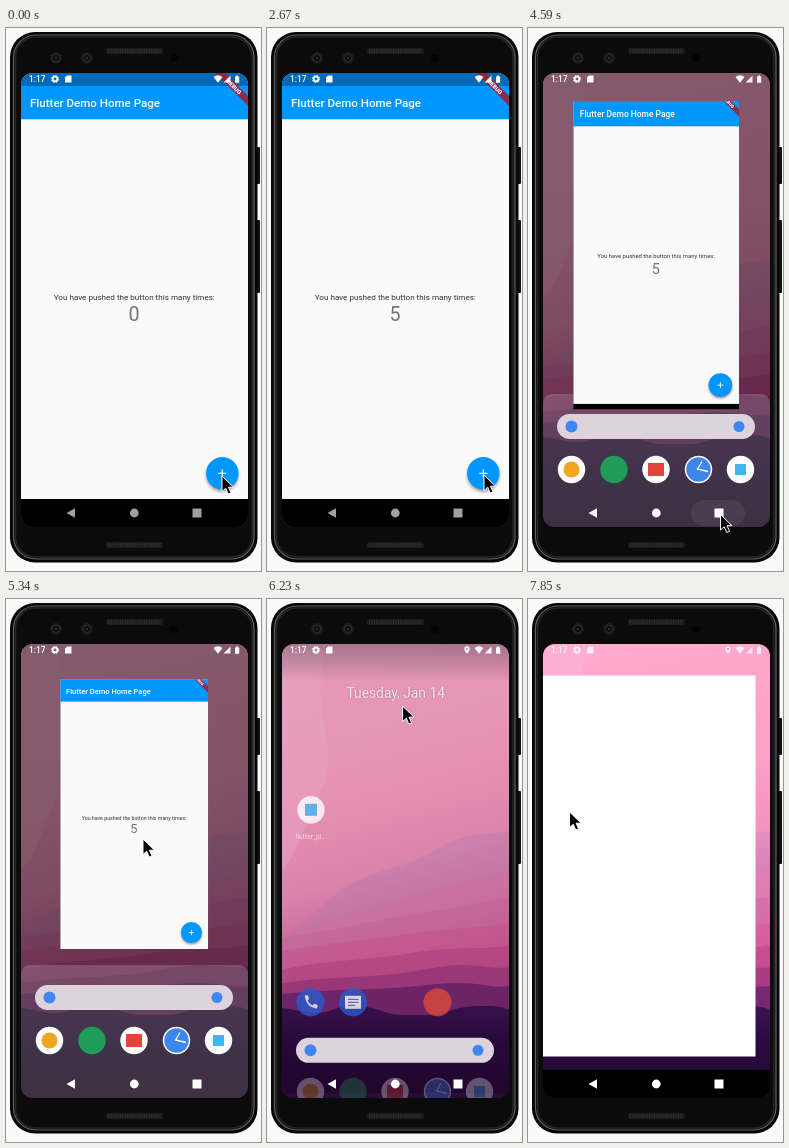
Recreate the animation shown at these times as an HTML page. Size 255x543 px, loop 8 s.

```html
<!DOCTYPE html>
<html lang="en">
<head>
<meta charset="utf-8">
<title>Counter demo</title>
<style>
html, body { margin: 0; width: 100%; height: 100%; overflow: hidden; background: #fafafa; }
svg { display: block; width: 100vw; height: 100vh; font-family: Roboto, "Noto Sans", sans-serif; }
</style>
</head>
<body>
<svg id="stage" viewBox="0 0 255 543"></svg>
<script>
const LOOP = 8000;

const disc = (x, y, r, fill, extra = '') => `<circle cx="${x}" cy="${y}" r="${r}" fill="${fill}" ${extra}/>`;
const box = (x, y, w, h, fill, extra = '') => `<rect x="${x}" y="${y}" width="${w}" height="${h}" fill="${fill}" ${extra}/>`;
const path = (d, fill, extra = '') => `<path d="${d}" fill="${fill}" ${extra}/>`;
const text = (x, y, size, fill, str, extra = '') =>
  `<text x="${x}" y="${y}" font-size="${size}" fill="${fill}" ${extra}>${str}</text>`;
const group = (id, body, extra = '') => `<g id="${id}" ${extra}>${body}</g>`;
const gradient = (id, stops, axis = 'x1="0" y1="0" x2="0" y2="1"') => `<linearGradient id="${id}" ${axis}>${
  stops.map(([o, c, a = 1]) => `<stop offset="${o}" stop-color="${c}" stop-opacity="${a}"/>`).join('')}</linearGradient>`;

const defs = `<defs>
  ${gradient('sky', [[0, '#ffabcf'], [.4, '#fd9fc7'], [.6, '#f191bd'], [.73, '#dd77ab'], [.82, '#c65491'], [.92, '#9c387e'], [1, '#6a216c']],
    'gradientUnits="userSpaceOnUse" x1="70" y1="40" x2="170" y2="420"')}
  ${gradient('hill', [[0, '#3d1254'], [.4, '#2b0a40'], [1, '#22062f']])}
  ${gradient('shade', [[0, '#303038', .42], [.5, '#303038', .24], [1, '#303038', 0]])}
  <clipPath id="screenClip"><rect x="15" y="45" width="227" height="454" rx="12"/></clipPath>
  <clipPath id="appClip"><rect id="appClipBox" x="15" width="227"/></clipPath>
  <filter id="soft" x="-50%" y="-50%" width="200%" height="200%"><feGaussianBlur stdDeviation="1.6"/></filter>
</defs>`;

const camera = x => disc(x, 30, 6, '#1b1b1c') + disc(x, 30, 3.6, '#0c0c0e', 'stroke="#333438" stroke-width=".8"') + disc(x, 30, 1.3, '#2a2b30');
const grille = y => box(100, y, 57, 6, '#1c1c1c', 'rx="2"')
  + `<path d="M102 ${y + 3}H155" stroke="#303030" stroke-width="4" stroke-dasharray="1 1.4"/>`;

const phone = box(249, 119, 5, 37, '#111', 'rx="1"') + box(249, 192, 5, 73, '#111', 'rx="1"')
  + box(4, 4, 247.5, 530.5, '#060606', 'rx="25"')
  + box(7.5, 7, 240.5, 524, '#0b0b0b', 'rx="22.5" stroke="#606164" stroke-width="1.2"')
  + box(9.5, 9, 236.5, 520, '#0b0b0b', 'rx="20" stroke="#262627" stroke-width="1.5"')
  + camera(50) + camera(81) + disc(168, 30, 4, '#040405')
  + grille(20) + grille(514);

const wallpaper = box(15, 45, 227, 454, 'url(#sky)')
  + path('M15 45H60C40 110 75 150 55 190S30 260 15 270Z', '#ffb6d6', 'opacity=".4"')
  + path('M15 345C40 322 62 296 87 283S140 268 170 250S220 236 242 232V420H15Z', '#c583be', 'opacity=".38"')
  + path('M15 345C60 318 110 312 150 296S215 284 242 270V420H15Z', '#ea7db2', 'opacity=".5"')
  + path('M15 338C70 332 120 318 165 312S220 300 242 298V420H15Z', '#cf62a0', 'opacity=".35"')
  + path('M15 352C60 344 110 340 150 334S215 330 242 324V430H15Z', '#d4508f', 'opacity=".4"')
  + path('M15 371C60 360 100 362 145 354S215 352 242 346V430H15Z', '#b23a85', 'opacity=".45"')
  + path('M15 384C70 376 110 380 160 370S220 372 242 368V430H15Z', '#94307c', 'opacity=".55"')
  + path('M15 395C70 389 110 392 160 386S220 390 242 387V430H15Z', '#64206c', 'opacity=".7"')
  + path('M15 409C30 410 40 415 52 414S70 407 82 407S105 408 115 412S130 416 145 416S165 417 178 413S200 407 214 407S235 407 242 411V499H15Z', 'url(#hill)');

const icon = (x, y, inner) => disc(x, y, 13.7, '#fff') + inner;
const appRow = icon(43.5, 441.5, disc(43.5, 441.5, 8, '#f2a51f'))
  + disc(86, 441.5, 13.7, '#1f9d58')
  + icon(128, 441.5, box(120, 435, 16, 13, '#e0443a'))
  + icon(170.5, 441.5, disc(170.5, 441.5, 12.2, '#3f85ee')
    + '<path d="M174 433.5L169.5 441L180 443.5" fill="none" stroke="#fff" stroke-width="1.3"/>')
  + icon(212.5, 441.5, box(207, 436, 11, 11, '#3fb6f2'));

const searchBar = box(29, 441, 198, 25, '#dcd3dc', 'rx="12.5"')
  + disc(43.5, 453.5, 6, '#4285f4') + disc(211, 453.5, 5.5, '#4285f4');

const home = text(128.7, 99.8, 13.8, '#fff', 'Tuesday, Jan 14', 'text-anchor="middle" style="text-shadow:0 0 2px #0006"')
  + icon(44, 212, box(38, 206, 12, 12, '#3fb6f2'))
  + text(44, 241, 6.7, '#fff', 'flutter_pl...', 'text-anchor="middle" opacity=".85"')
  + disc(43.5, 404.5, 14, '#2a5bcc')
  + path('M38 399Q37 398 38.5 397.5H41L42 401L40.5 402.7Q42 406 45.5 407.6L47.2 406L50.5 407V409.5Q50 411 48.5 410.5Q39 408.5 38 399Z', '#fff')
  + disc(86, 404.5, 14, '#2a5bcc')
  + path('M78 398H94V411H81L78 411Z', '#fff')
  + path('M81 401.5H91.5M81 404.5H91.5M81 407.5H88', 'none', 'stroke="#2a5bcc"')
  + disc(170.5, 404.5, 14, '#db4a3a');

const app = box(15, 45, 227, 434, '#000') + box(15, 45, 227, 426, '#fafafa')
  + box(15, 90, 227, 2, '#000', 'opacity=".14"')
  + box(15, 45, 227, 46, '#0096ff')
  + box(15, 45, 227, 13, '#0069b8', 'id="appStatus"')
  + text(24, 79, 11.56, '#fff', 'Flutter Demo Home Page', 'font-weight="500"')
  + `<g transform="translate(242 45) rotate(45)">${box(-24, 16.2, 48, 7, '#a51c30', 'opacity=".85"')}${
    text(0, 21.8, 5.7, '#fff', 'DEBUG', 'text-anchor="middle" font-weight="900"')}</g>`
  + text(128.3, 272, 8.1, '#303030', 'You have pushed the button this many times:', 'text-anchor="middle"')
  + text(128, 293, 19.7, '#757575', '0', 'id="count" text-anchor="middle"')
  + disc(216.3, 447.5, 16.2, '#000', 'opacity=".38" filter="url(#soft)"')
  + disc(216.3, 445.3, 16.2, '#0096ff')
  + disc(216.3, 445.3, 16.2, '#fff', 'id="ripple" opacity="0"')
  + '<path d="M212.2 445.3H220.4M216.3 441.2V449.4" stroke="#fff" stroke-width="1.2"/>'
  + box(15, 45, 227, 434, '#000', 'id="dim" opacity="0"');

const status = text(23, 54.3, 8.3, '#fff', '1:17', 'font-weight="500"')
  + '<circle cx="49" cy="51" r="2.3" fill="none" stroke="#fff" stroke-width="1.8"/>'
  + '<circle cx="49" cy="51" r="3.6" fill="none" stroke="#fff" stroke-width="1" stroke-dasharray="1.5 1.33"/>'
  + path('M61 47.5H65.5V54.5H59V49.5Z', '#fff')
  + path('M207.5 49Q212 45.6 216.5 49L212 54.7Z', '#fff')
  + path('M217.5 54.5L224.5 47.5V54.5Z', '#fff', 'opacity=".9"')
  + path('M229 48.5H230.2V47.4H232V48.5H233.2V54.8H229Z', '#fff')
  + group('pin', path('M200 55Q197.3 51.5 197.3 50A2.7 2.7 0 0 1 202.7 50Q202.7 51.5 200 55Z', '#fff') + disc(200, 50, 1, '#b08098'));

const navIcons = path('M60.5 485L69 480.3V489.7Z', 'currentColor') + disc(128.3, 485, 4.4, 'currentColor')
  + box(186.5, 480.5, 9, 9, 'currentColor');

const cursor = path('M0 0V15.6L3.7 12.2L6.2 18L9 16.8L6.5 11.2H11.5Z', '#000', 'stroke="#fff" stroke-width="1"');

const stage = document.getElementById('stage');
stage.innerHTML = defs + phone + `<g clip-path="url(#screenClip)">`
  + wallpaper
  + group('topShade', box(15, 45, 227, 38, 'url(#shade)'))
  + box(15, 45, 227, 454, '#000', 'id="scrim"')
  + group('panel', box(15, 366, 227, 150, '#fff', 'rx="9" opacity=".18"'))
  + group('appRow', appRow)
  + group('search', searchBar)
  + group('home', home)
  + group('card', group('appBody', app, 'clip-path="url(#appClip)"'))
  + box(0, 0, 0, 0, '#fff', 'id="launch"')
  + group('navBar', box(15, 471, 227, 28, '#000'))
  + box(163, 472, 54, 26, '#fff', 'id="navRipple" rx="13" opacity=".06"')
  + group('nav', navIcons)
  + group('status', status)
  + '</g>' + group('cursor', cursor);

const el = Object.fromEntries([...stage.querySelectorAll('[id]')].map(e => [e.id, e]));
const set = (id, attrs) => { for (const k in attrs) el[id].setAttribute(k, attrs[k]); };
const show = (id, opacity) => set(id, { opacity });
const shift = (id, x, y) => set(id, { transform: `translate(${x} ${y})` });

// Interpolates rows of [time, ...values].
function track(t, rows) {
  const next = rows.findIndex(r => r[0] > t);
  if (next < 0) return rows[rows.length - 1].slice(1);
  if (next === 0) return rows[0].slice(1);
  const a = rows[next - 1], b = rows[next], k = (t - a[0]) / (b[0] - a[0]);
  return a.slice(1).map((v, i) => v + (b[i + 1] - v) * k);
}

// The picture only refreshes at these moments: [first, last, count].
const clicks = [590, 1180, 1620, 2070, 2520];
const ticks = [0, 140];
[...clicks.map(c => [c, c + 150, 2]), [3410, 4440, 8], [4590, 5340, 6], [5790, 6820, 8], [6970, 7110, 2], [7410, 7850, 4]]
  .forEach(([a, b, n]) => {
    for (let i = 0; i < n; i++) ticks.push(Math.floor((a + (b - a) * i / (n - 1)) / 10) * 10);
  });

const cursorPath = [
  [0, 216, 448], [139, 216, 448], [140, 217, 447], [3380, 217, 447], [3850, 205, 465], [4290, 192.5, 486.5],
  [4740, 192.5, 486.5], [5340, 137, 240], [5780, 137, 240], [5790, 137, 190], [5930, 135.6, 107],
  [6380, 135.6, 107], [6820, 66, 214], [7110, 41.6, 213]];
// scale, top, dim, opacity
const cardPath = [
  [4590, .731, 74, 0, 1], [4740, .67, 79, 0, 1], [4890, .652, 81, 0, 1], [5780, .652, 81, 0, 1],
  [5790, .652, 25, .1, 1], [5930, .652, -170, .42, .82]];

function draw(time) {
  const t = ticks.filter(s => s <= time).pop();
  const inApp = t < 4590, carded = !inApp && t < 6050, opening = t >= 7540;

  el.count.textContent = clicks.filter(c => c <= t).length;
  show('ripple', clicks.includes(t) ? .25 : 0);

  const [scale, top, dim, opacity] = track(t, cardPath);
  show('card', inApp ? 1 : carded ? opacity : 0);
  show('dim', inApp ? 0 : dim);
  show('appStatus', inApp ? 1 : 0);
  set('card', { transform: inApp ? '' : `translate(${128.2 - 128.5 * scale} ${top - 58 * scale}) scale(${scale})` });
  set('appClipBox', inApp ? { y: 45, height: 434 } : { y: 56.7, height: t < 4740 ? 421.5 : 414.3 });

  // q: 1 in the overview, 0 on the home screen
  const [q] = track(t, [[5930, 1], [6070, .6], [6230, .2], [6370, 0]]);
  const [shown] = track(t, [[7400, 1], [7410, .88], [7550, .35], [7700, 0]]);
  const slide = q * q;
  show('scrim', .48 * q);
  show('panel', q);
  shift('panel', 0, 133 * (1 - slide));
  show('appRow', Math.min(1, 1.5 * q));
  shift('appRow', 0, 53 * (1 - slide));
  show('search', shown);
  shift('search', 0, -55 * slide);
  show('home', (1 - q) * shown);
  shift('home', 0, -30 * slide);
  show('topShade', shown * (1 - q));

  const [p] = track(t, [[7410, 0], [7550, .3], [7700, .7], [7850, 1]]);
  const mix = (a, b) => a + (b - a) * p;
  const left = mix(30, 15), y = mix(198, 76.5);
  set('launch', {
    x: left, y, width: mix(58, 227.5) - left, height: mix(226, 457.5) - y,
    rx: 14 * (1 - p), opacity: opening ? 1 : 0
  });

  show('navBar', inApp || t >= 7850 ? 1 : 0);
  show('navRipple', t >= 4440 && t < 4740 ? .06 : 0);
  set('nav', { color: t < 4440 ? '#a0a0a0' : '#fff' });
  show('status', t >= 7850 ? .8 : 1);
  show('pin', t >= 5790 ? 1 : 0);
  shift('cursor', ...track(t, cursorPath));
}

const start = performance.now();
function loop() {
  draw((performance.now() - start) % LOOP);
  requestAnimationFrame(loop);
}
loop();
</script>
</body>
</html>
```
